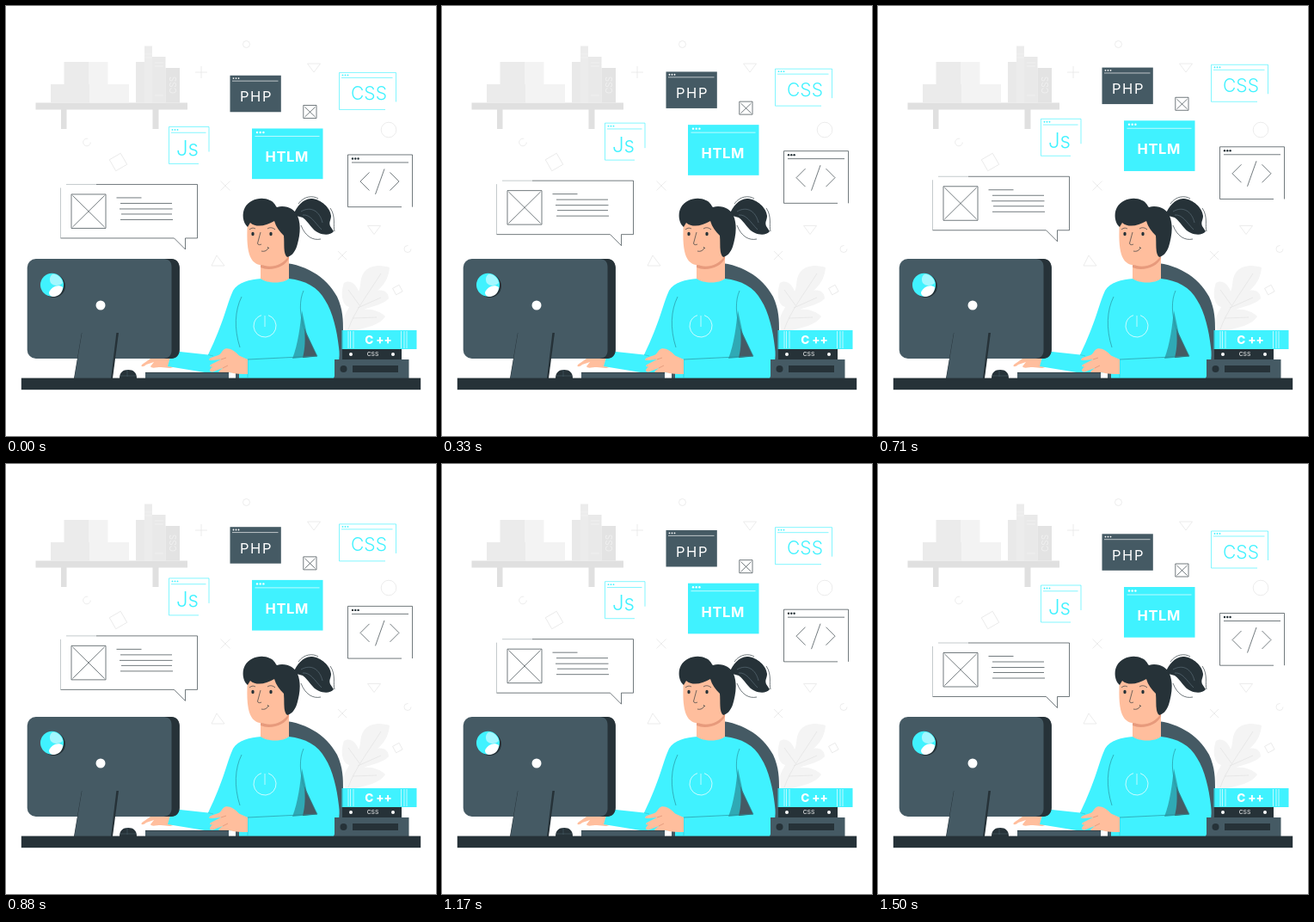
An HTML page for the animation above (1540 ms loop, 500 px wide and 500 px high).

```html
<!DOCTYPE html>
<html lang="en">
<head>
<meta charset="utf-8">
<title>Coding at the desk</title>
<style>
  html, body { margin: 0; width: 100%; height: 100%; overflow: hidden; background: #fff; }
  svg { display: block; width: 100vw; height: 100vh; }
  text { font-family: Inter, "Open Sans", sans-serif; text-anchor: middle; }
  .line { fill: none; stroke-width: .65; }
  .cy { fill: #40f2ff; }
  .slate { fill: #455a64; }
  .dark { fill: #263238; }
  .skin { fill: #ffbe9d; }
  .ink { stroke: #263238; }
  .aqua { stroke: #40f2ff; }
  .white { stroke: #fff; }
  .pale { stroke: #e2e2e2; }
</style>
</head>
<body>
<svg viewBox="0 0 500 500">
  <rect width="500" height="500" fill="#fff"/>

  <g id="shelf">
    <path fill="#e0e0e0" d="M34.500 112.500H211V120.500H177.500V143H170.500V120.500H70.500V143H64V120.500H34.500Z"/>
    <path fill="#ebebeb" d="M67.500 65H96V91H67.500ZM52 91H97V112.500H52Z"/>
    <path fill="#f3f3f3" d="M96 65H118.500V91H143V112.500H97V91H96Z"/>
    <path fill="#e9e9e9" d="M151 65H161V112.500H151ZM170 59H185.500V112.500H170Z"/>
    <path fill="#ececec" d="M161 46.500H170V112.500H161Z"/>
    <path fill="#e3e3e3" d="M185.500 72H202V112.500H185.500Z"/>
    <path class="line" stroke="#f4f4f4" d="M161 56H170M161 60H170M173 66H183M173 70H183M173 104H183"/>
    <text transform="translate(198 92) rotate(-90)" font-size="10" font-weight="300" fill="#f3f3f3">CSS</text>
  </g>

  <g class="line pale">
    <circle cx="279.500" cy="44.500" r="4"/>
    <circle cx="445" cy="144" r="8.800"/>
    <circle cx="94" cy="158.500" r="4.300" stroke-dasharray="21 6"/>
    <circle cx="467" cy="282.500" r="4" stroke-dasharray="19 6"/>
    <path d="M220 77H234M227 70V84M350.500 67H365.500L358 77ZM420.500 255.500H435.500L428 265.500ZM239 302L245 290L254 302Z"/>
    <path d="M249.500 203.500L260.500 214.500M260.500 203.500L249.500 214.500M386 285L396 295M396 285L386 295"/>
    <rect x="123" y="174" width="15" height="15" transform="rotate(-30 130.500 181.500)"/>
    <rect x="451" y="326" width="8.500" height="8.500" transform="rotate(-28 455 330)"/>
  </g>

  <path fill="#f4f4f4" d="M394 377C390 362 396 357 399 350C390 347 389 333 393 322C401 317 408 325 410 332C414 324 410 314 420 306C428 300 440 302 446 304C445 314 442 322 432 331C440 329 445 334 445 340C438 348 425 349 416 353C426 352 435 355 441 361C434 372 418 374 406 377Z"/>
  <path class="line" stroke="#e0e0e0" d="M398 376C405 355 421 335 436 311M411 348L398 330M409 351L436 339M403 363L431 362"/>

  <path class="slate" d="M300 300C336 293 370 310 385 338C392 353 392 366 392 378V433H267V426H300Z"/>

  <!-- far arm -->
  <path class="skin" d="M195 403C184 402 174 406 168 410L158 417C156 420 160 420 163 417L172 414L168 419C169 422 175 420 180 420L191 421L204 417V405Z"/>
  <path class="cy" d="M193 401L235 405.500L267 409V426L237 427L188 419Z"/>
  <path class="cy" d="M297 317C283 318 270 321 264 331C257 346 253 369 235 405.500L271 421V433H381C386 420 389 410 387 397C385 378 380 356 371 342C363 327 348 319 329 317Z"/>
  <path fill="#2fa9b5" d="M344 354L349 377L353 408L333 410C340 392 342 372 344 354Z"/>
  <path class="slate" d="M347 375L362 407.500L345 409C348 398 348 387 347 375Z"/>
  <path class="line" stroke="#278c98" d="M346 331C341 342 341 358 347 377L362 407L281 411M274 338C266 354 265 375 272 397"/>
  <path class="line" stroke="#2ec4cf" d="M281 411V432M235 405.500L241 407"/>
  <circle class="line white" cx="301" cy="372" r="13" stroke-dasharray="73 9" transform="rotate(-72 301 372)"/>
  <path class="line white" d="M301 360V373"/>

  <!-- near hand -->
  <path class="skin" d="M281 411L271 406.500C266 401 260 397.500 255 398.500C251 400 251 404 247 406L238 409C235 411 236 412.500 239 412L250 411L238 417C236 419 238 420 240 419L237 423C237 426 240 426 243 424.500L252 421L247 425C249 428 255 427 260 426C267 428 275 428 281 428Z"/>
  <path class="line" stroke="#d78d72" d="M250 411L256 409M252 421L258 418"/>

  <!-- head -->
  <path class="dark" d="M334 243C338 233 346 223 356 224C366 225 377 234 378 244C378 249 375 251 377 256L381 262C377 267 369 266 364 264C356 261 352 251 345 246Z"/>
  <path class="line" stroke="#5f727c" d="M343 239C355 232 365 239 368 252M345 243C354 242 359 252 367 260"/>
  <path class="line ink" stroke-width=".6" d="M340 230C346 221 357 220 363 224M377 235C384 245 380 256 382 262M343 255C348 268 357 273 366 271"/>
  <path class="skin" d="M296 290V317C304 323 322 323 329 317V282Z"/>
  <path fill="#e79a7c" d="M296 300C306 306 322 302 329 290V293C325 304 307 309 296 304Z"/>
  <path class="skin" d="M281 250C280 266 280 279 283 289C286 298 292 302 300 301C314 300 325 292 329 282L326 245Z"/>
  <path class="dark" d="M281 257C275 252 274 241 278 234C283 225 297 221 307 226C312 228 313 232 315 234C325 231 336 236 339 244C344 256 341 270 338 280C335 288 331 291 327 292C322 288 324 277 323 267C318 262 314 257 312 250C302 256 291 258 284 252C283 254 282 255 281 257Z"/>
  <ellipse class="dark" cx="287" cy="265" rx="1.700" ry="2.200"/>
  <ellipse class="dark" cx="308" cy="265" rx="1.700" ry="2.200"/>
  <path class="line ink" stroke-width="1" d="M283 260C286 257.500 288 258 290 259M304 259C307 257 310 257.500 313 260"/>
  <path class="line ink" d="M296 263L292.500 276C293 278 295 278 297 277M297 285C301 286 304 284 305 281M304 280L306 282"/>

  <!-- monitor -->
  <rect class="dark" x="36" y="294" width="165.700" height="116" rx="10"/>
  <rect class="slate" x="24.700" y="294" width="169.300" height="116" rx="10"/>
  <path class="dark" d="M186 294H192C198 294 201.700 298 201.700 304V400C201.700 406 198 410 192 410H183C189 410 192.500 406 192.500 401V303C192.500 298 190 295 186 294Z"/>
  <path class="dark" d="M88 380H131L124 433H79Z"/>
  <path class="slate" d="M88.500 379H128.500L122 433H79.500Z"/>
  <circle cx="110" cy="348" r="5.500" fill="#fff"/>
  <circle class="dark" cx="55.500" cy="325.500" r="13.500"/>
  <circle class="cy" cx="53.500" cy="324.300" r="13.500"/>
  <path fill="#a3f8ff" d="M54 312C59 311 65 316 66 322C62 326 55 326 52 322C50 318 51 314 54 312Z"/>
  <path fill="#fff" d="M50 333C53 326 61 323 66 327C66 333 62 337 56 338C52 338 50 336 50 333Z"/>

  <path class="dark" d="M132 433C132 426 136 423 142 423C148 423 152 426 152 433Z"/>
  <path class="line" stroke="#455a64" d="M141 423V431M133 430H151"/>
  <rect class="slate" x="162" y="426" width="97" height="7"/>
  <path class="line ink" d="M162 426.400H259"/>

  <!-- book pile -->
  <rect class="cy" x="390.500" y="377" width="87" height="22"/>
  <path class="line" stroke="#278c98" d="M391 377V399"/>
  <path class="line white" d="M398 378V398M400.500 378V398M404 378V398M459.500 378V398M463 378V398M466 378V398"/>
  <text x="433" y="392.500" font-size="13.500" font-weight="800" fill="#fff">C ++</text>
  <rect class="dark" x="391" y="399" width="69" height="12"/>
  <text x="426.500" y="407.400" font-size="6.800" fill="#fff">CSS</text>
  <circle cx="401" cy="405" r="2" fill="#fff"/>
  <circle cx="450" cy="405" r="2" fill="#fff"/>
  <rect class="slate" x="382" y="411" width="86.500" height="22"/>
  <circle class="dark" cx="392.500" cy="422" r="4"/>
  <rect class="dark" x="403" y="418" width="53" height="8"/>
  <rect class="dark" x="17.800" y="432.600" width="464.400" height="13.600"/>

  <g id="float">
    <rect class="slate" x="260.500" y="81.300" width="59.300" height="42.500"/>
    <path class="line white" d="M263 87.700H316.500"/>
    <g fill="#fff"><circle cx="264.500" cy="84.600" r=".9"/><circle cx="267.500" cy="84.600" r=".9"/><circle cx="270.500" cy="84.600" r=".9"/></g>
    <text x="291" y="112" font-size="16.500" font-weight="400" letter-spacing="1.600" fill="#fff">PHP</text>

    <path class="line aqua" d="M441 121H387.500V78H453.500V112"/>
    <path class="line aqua" d="M390 84H449.500"/>
    <g class="cy"><circle cx="391.500" cy="81" r=".9"/><circle cx="394.500" cy="81" r=".9"/><circle cx="397.500" cy="81" r=".9"/></g>
    <text x="422" y="109.500" font-size="21" font-weight="300" class="cy">CSS</text>

    <path class="line ink" d="M345.800 116H361V131H345.800ZM347.500 118L359.500 129.500M359.500 118L347.500 129.500"/>

    <path class="line aqua" d="M224 184H189.500V141H236V170"/>
    <path class="line aqua" d="M192 147.800H232.500"/>
    <g class="cy"><circle cx="193.500" cy="144.500" r=".9"/><circle cx="196.500" cy="144.500" r=".9"/><circle cx="199.500" cy="144.500" r=".9"/></g>
    <text x="211" y="174.500" font-size="24" font-weight="300" class="cy">Js</text>

    <rect class="cy" x="286" y="143" width="82.500" height="58.700"/>
    <path class="line white" d="M289.500 152H364.500"/>
    <g fill="#fff"><circle cx="292" cy="147.500" r="1.200"/><circle cx="295.700" cy="147.500" r="1.200"/><circle cx="299.400" cy="147.500" r="1.200"/></g>
    <text x="326.700" y="182" font-size="16.500" font-weight="700" letter-spacing=".6" fill="#fff">HTLM</text>

    <path class="line ink" d="M460 234.200H397.500V173.500H472.500V234.200"/>
    <path class="line ink" d="M402 182.500H468"/>
    <g class="dark"><circle cx="403" cy="178" r="1.200"/><circle cx="406.300" cy="178" r="1.200"/><circle cx="409.600" cy="178" r="1.200"/></g>
    <path class="line ink" d="M422.500 194L412 204.500L422.500 215M440 190L429.500 219.500M446.500 194L457 204.500L446.500 215"/>

    <path class="line ink" d="M105 208H222.500V270.500H208.500V283.500L195.500 270.500H63.500"/>
    <path class="line" stroke="#a5adb1" stroke-width=".5" d="M105 208H70M63.500 212V270.500"/>
    <path class="line ink" d="M76 219.500H116V259H76ZM77.500 221L114.500 257.500M114.500 221L77.500 257.500"/>
    <path class="line ink" d="M128.500 223.500H157.500M133 230H193M132 236.500H193.500M134 242.500H193M133 249H194"/>
  </g>
</svg>
<script>
  const LOOP = 1540, STEPS = 37, RISE = 10;
  const group = document.getElementById("float");

  // Straight up and down at constant speed, lowest point on the last step.
  function draw(ms) {
    const step = Math.floor((ms % LOOP) * STEPS / LOOP + 0.1);
    const p = ((step + 1) % STEPS) / STEPS;
    const y = -RISE * (1 - Math.abs(1 - 2 * p));
    group.setAttribute("transform", `translate(0 ${y.toFixed(2)})`);
  }

  const start = performance.now();
  function tick() {
    draw(performance.now() - start);
    requestAnimationFrame(tick);
  }
  tick();
</script>
</body>
</html>
```
